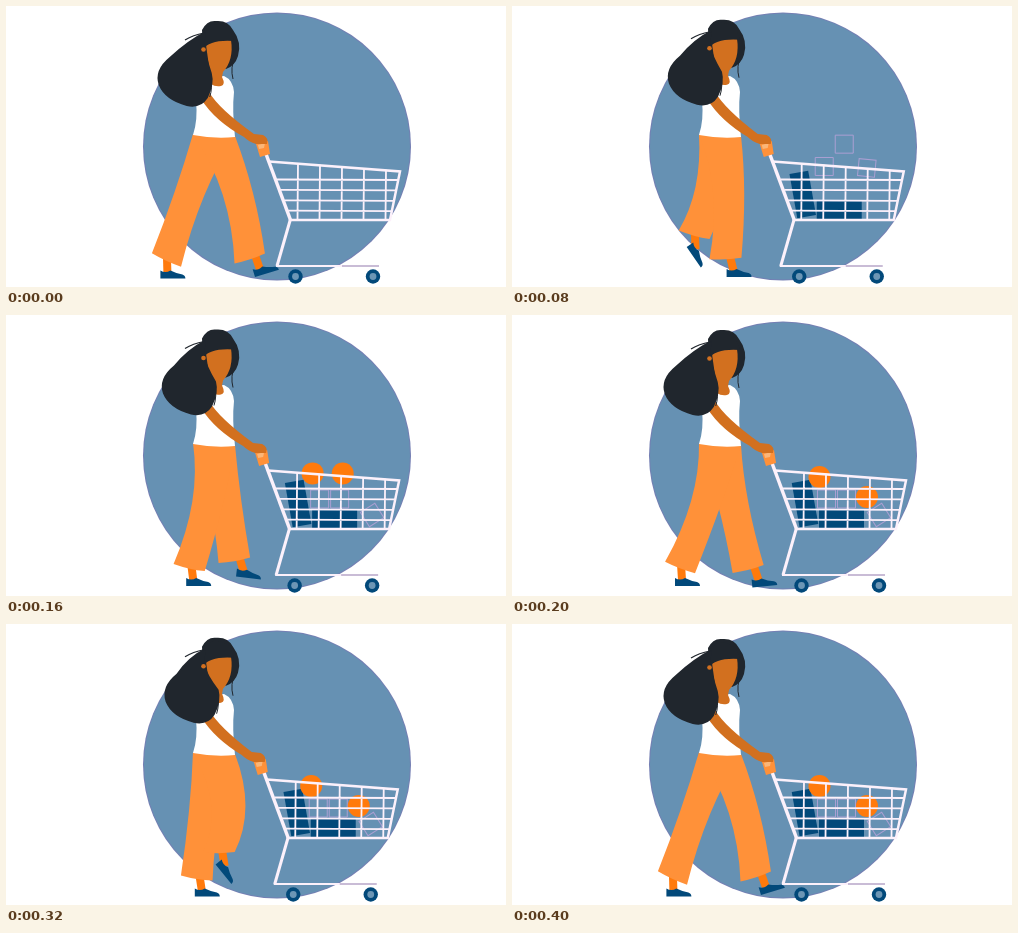
Write an HTML page with a canvas that moves like this. It is 500x281 px and loops after 0.42 s.

```html
<!DOCTYPE html>
<html>
<head>
<meta charset="utf-8">
<style>
html, body { margin: 0; width: 100%; height: 100%; overflow: hidden; background: #fff; }
canvas { display: block; }
</style>
</head>
<body>
<canvas id="stage" width="500" height="281"></canvas>
<script>
const ctx = document.getElementById('stage').getContext('2d');
const LOOP = 420, STEP = 20, STRIDE = 400;
const BLUE = '#6691b3', NAVY = '#02497a', PANTS = '#ff9139', SKIN = '#d2701f',
      ORANGE = '#ff7a0c', HAIR = '#20262d', WIRE = '#fcf1fb', LILAC = '#aa9fd2';

// touch: heel strike time, stance: time on the ground, ease: swing acceleration
const farLeg = { touch: 180, stance: 220, ease: 1.9, lean: -2, ground: 272.5 };
const nearLeg = { touch: 0, stance: 200, ease: 1.2, lean: 12, ground: 271 };

// Each item drops in a straight line, then rolls and turns as it lands
const goods = [
  { x: 296, y: 188.5, start: 0, fall: 80, w: 19, h: 45, roll: -3, turn: -10 },
  { x: 329.5, y: 204, start: 0, fall: 80, w: 45, h: 18 },
  { x: 314.5, y: 184, start: 33, fall: 57, w: 18, h: 18, hollow: true },
  { x: 334.5, y: 184, start: 30, fall: 76, w: 18, h: 18, hollow: true },
  { x: 356, y: 200, start: 33, fall: 63, w: 17, h: 17, roll: 11, turn: 58, hollow: true },
  { x: 307.5, y: 162, start: 100, fall: 62, r: 11 },
  { x: 333, y: 182, start: 100, fall: 73, r: 11, roll: 22 }
];

const wave = (t, lag = 0) => 1 - Math.cos(2 * Math.PI * (t - lag) * 2 / STRIDE);

function fill(color, d) {
  ctx.fillStyle = color;
  ctx.fill(new Path2D(d));
}

function stroke(color, width, d) {
  ctx.strokeStyle = color;
  ctx.lineWidth = width;
  ctx.stroke(new Path2D(d));
}

function disc(color, x, y, r) {
  ctx.fillStyle = color;
  ctx.beginPath();
  ctx.arc(x, y, r, 0, 7);
  ctx.fill();
}

function placed(x, y, degrees, draw) {
  ctx.save();
  ctx.translate(x, y);
  ctx.rotate(degrees * Math.PI / 180);
  draw();
  ctx.restore();
}

function heelPose({ touch, stance, ease, ground }, t) {
  const front = 249, speed = .43;
  const age = (t - touch + STRIDE) % STRIDE;
  if (age < stance)
    return { x: front - speed * age, y: ground, lift: 0, angle: -17 * Math.max(0, 1 - age / 30) };
  const q = (age - stance) / (STRIDE - stance);
  const lift = 32 * Math.sin(Math.PI * q);
  return {
    x: front - speed * stance * (1 - q ** ease),
    y: ground - lift,
    lift,
    angle: 2 * lift - 17 * q
  };
}

function drawLeg(leg, t) {
  const { x, y, lift, angle } = heelPose(leg, t);
  const a = angle * Math.PI / 180;
  const ankleX = x + 7 * Math.cos(a) + 6 * Math.sin(a);
  const ankleY = y + 7 * Math.sin(a) - 6 * Math.cos(a);

  const hemX = x + .12 * (205 - x + lift), hemY = y - 18.5 + .2 * lift;
  const tilt = .45 * (209 - x) * Math.PI / 180;
  const dx = 16 * Math.cos(tilt), dy = 16 * Math.sin(tilt);
  const lx = hemX - dx, ly = hemY - dy, rx = hemX + dx, ry = hemY + dy;
  const leftKnee = (187 + lx) / 2 + leg.lean + 6 + .3 * lift;
  const rightKnee = (229 + rx) / 2 + leg.lean - 6 + .5 * lift;

  stroke(ORANGE, 8, `M${(hemX + ankleX) / 2},${hemY - 4}L${ankleX},${ankleY}`);
  placed(x, y, angle, () => fill(NAVY, 'M0,0L0,-8Q5,-5 10,-8Q16,-5 22,-4Q25,-3 25,0Z'));
  fill(PANTS, `M187,128Q${leftKnee},185 ${lx},${ly}Q${hemX},${hemY + 2} ${rx},${ry}`
    + `Q${rightKnee},185 229,130Z`);
}

function drawGoods(t) {
  for (const { x, y, start, fall, w, h, r, roll = 0, turn = 0, hollow } of goods) {
    if (t <= start) continue;
    const p = Math.min(1, (t - start) / fall), landed = p ** 8;
    const size = Math.min(1, 2 * p);
    placed(x + roll * landed, 50 + (y - 50) * p, turn * landed, () => {
      if (r) return disc(ORANGE, 0, 0, r * size);
      const box = `M${-w * size / 2},${-h * size / 2}h${w * size}v${h * size}h${-w * size}z`;
      hollow ? stroke(LILAC, 1, box) : fill(NAVY, box);
    });
  }
}

function drawCart() {
  let wires = '';
  for (let y = 174; y < 210; y += 10.4)
    wires += `M${264 + (y - 155) * .36},${y - .5}L${394 - (y - 165) * .21},${y}`;
  for (let i = 0; i < 5; i++)
    wires += `M${292 + 22 * i},${157 + 1.7 * i}L${291.5 + 22 * i},214`;
  stroke(WIRE, 1.8, wires);
  stroke(WIRE, 2.5, 'M263,155.5L394,165.5L384,214L284,214');
  stroke(WIRE, 3.5, 'M260,148L284.5,214');
  stroke(WIRE, 3, 'M284.5,213L271,260');
  stroke(WIRE, 2.2, 'M270,260H336');
  stroke('#c9bcd6', 1.8, 'M336,260H373');
  for (const x of [289.5, 367]) {
    disc(NAVY, x, 270.5, 7.2);
    disc('#6c96b5', x, 270.5, 3.4);
  }
}

function drawHead(sway) {
  const s = x => x + sway;
  fill(HAIR, 'M196,24Q201,14 210,15Q222,14 227,24Q236,36 232,50Q229,60 220,63L198,62Z');
  stroke(HAIR, 1, 'M229,50Q224,62 227,73');
  fill(SKIN, 'M200,39Q212,32 225,34Q228,54 217,66L216,71Q220,79 215,80Q209,81 205,78L203,60Z');
  fill(HAIR, 'M195,42Q192,24 208,18Q224,18 228,35Q214,34 206,37Q199,39 199,43Z');
  fill(HAIR, `M200,25Q182,34 ${s(163)},51Q${s(147)},64 ${s(152)},79Q${s(158)},94 ${s(180)},100`
    + `Q${s(194)},103 ${s(201)},92Q${s(208)},78 ${s(205)},67Q201,52 198,40Z`);
  stroke(HAIR, 1.2, 'M198,27Q187,29 179,34');
  stroke(HAIR, 1, `M${s(204)},70Q${s(206)},82 ${s(203)},91`);
  disc(SKIN, 197.5, 43.5, 2.3);
}

function drawTorso(shift) {
  const hx = x => x + shift;
  fill('#fff', 'M204,72L218,70Q227,74 228,86Q226,104 229,131Q208,133 187,129Q192,114 190,95Z');
  fill(PANTS, `M${hx(250)},138L${hx(262)},135L${hx(264)},148L${hx(254)},151Z`);
  fill('#fab678', `M${hx(252)},139L${hx(259)},137L${hx(258)},142L${hx(253)},143Z`);
  fill(SKIN, `M203,86Q213,103 ${hx(248)},128L${hx(257)},129Q${hx(263)},132 ${hx(261)},138`
    + `L${hx(250)},138Q${hx(243)},136 ${hx(238)},131Q209,115 195,93Z`);
}

function draw(t) {
  const shift = -1.25 * wave(t);
  ctx.fillStyle = '#fff';
  ctx.fillRect(0, 0, 500, 281);
  disc('#747fb3', 271, 140.5, 134);
  disc(BLUE, 271, 140.5, 133);

  drawLeg(farLeg, t);
  drawLeg(nearLeg, t);
  placed(shift, 0, 0, () => {
    drawGoods(t);
    drawCart();
  });
  drawTorso(shift);
  placed(0, -.7 * wave(t), 0, () => drawHead(3.8 * wave(t, 20)));
}

function tick() {
  draw(Math.floor(performance.now() % LOOP / STEP) * STEP);
  requestAnimationFrame(tick);
}
tick();
</script>
</body>
</html>
```
